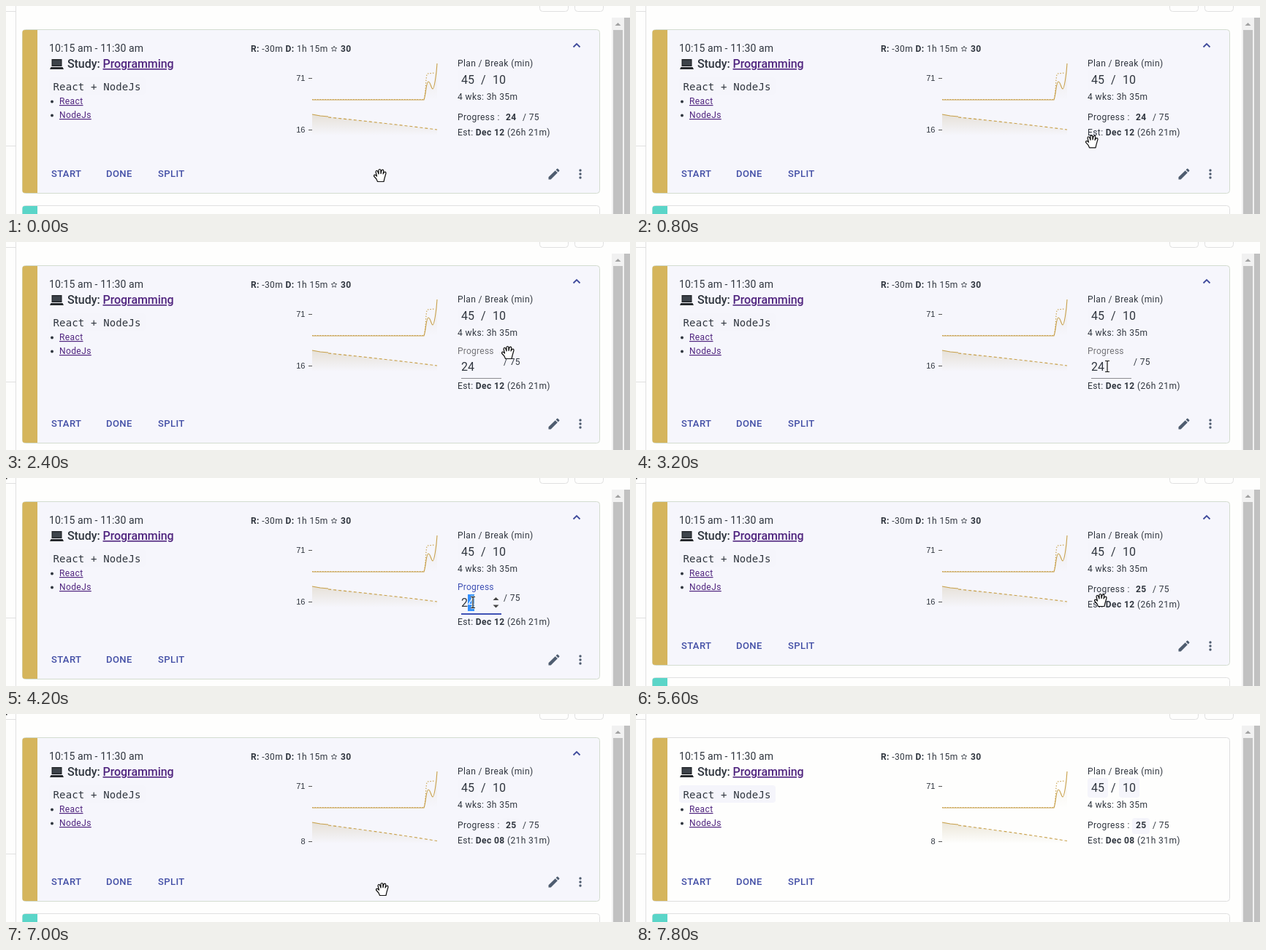
An HTML page that plays this animation: 854 px wide and 286 px high, repeating every 9200 ms.

```html
<!DOCTYPE html>
<html lang="en">
<head>
<meta charset="utf-8">
<title>Study card</title>
<style>
html, body { margin: 0; height: 100%; overflow: hidden; background: #fefefd }
svg { display: block; width: 854px; height: 286px }
text { font: 12px Roboto, sans-serif; letter-spacing: .4px; fill: #30363f }
.body { font-size: 14px; letter-spacing: .1px }
.big { font-size: 16px; letter-spacing: 0 }
.title { font-weight: 500; letter-spacing: -.06px }
.code { font: 14px "DejaVu Sans Mono", monospace; letter-spacing: .15px }
.axis { font: 11px "Liberation Sans", Arial, sans-serif; letter-spacing: 0; text-anchor: end }
.btn { font-size: 13px; font-weight: 500; letter-spacing: .42px; fill: #434fa6 }
.link { fill: #50257f; text-decoration: underline }
.b { font-weight: 700 }
.frame { fill: none; stroke: #e0e0e0 }
.chip { fill: #f5f5fb }
.plot { fill: none; stroke: #c8a04a; stroke-width: 1.1 }
#label { letter-spacing: .25px }
</style>
</head>
<body>
<svg viewBox="0 0 854 286">
  <defs>
    <linearGradient id="fade" x1="0" y1="0" x2="0" y2="1">
      <stop offset="0" stop-color="#bba878" stop-opacity=".27"/>
      <stop offset="1" stop-color="#bba878" stop-opacity="0"/>
    </linearGradient>
  </defs>

  <!-- page surroundings -->
  <path class="frame" d="M13.5 0V286M0 7.5H13M0 192.5H13"/>
  <rect class="frame" x="730.5" y="-20" width="39" height="27.5" rx="4"/>
  <rect class="frame" x="778.5" y="-20" width="39" height="27.5" rx="4"/>
  <path fill="#f1f1f1" d="M829 16h17v270h-17z"/>
  <path fill="#c1c1c1" d="M831 33h13v253h-13zM846 16h8v270h-8z"/>
  <path fill="#a0a0a0" d="M833.500 27l4-4 4 4z"/>
  <rect id="mark" width="1.500" height="1.500" fill="#222"/>
  <g id="next">
    <rect class="frame" x="22.5" y="274.5" width="790" height="40" rx="4"/>
    <path fill="#5ad5c8" d="M43 275H26q-3.500 0-3.500 3V286H43z"/>
  </g>

  <!-- card -->
  <rect id="card" x="22.5" y="32.5" width="790" rx="4"/>
  <path id="bar" fill="#d5b55c"/>
  <text class="body" x="59" y="63">10:15 am - 11:30 am</text>
  <path fill="#25282c" d="M62.500 73h14v10h-14zM61.500 84h16l1.500 3h-19z"/>
  <path fill="#3d434a" d="M64 74.500h11v7h-11z"/>
  <text class="big title" x="84" y="85">Study: <tspan class="link">Programming</tspan></text>
  <text x="335" y="63"><tspan class="b">R:</tspan> -30m <tspan class="b">D:</tspan> 1h 15m</text>
  <path id="star" fill="none" stroke="#30363f" stroke-width=".8"/>
  <text class="b" x="458" y="63">30</text>
  <rect class="chip" x="59" y="98" width="132" height="24" rx="4"/>
  <text class="code" x="64.500" y="115.500">React + NodeJs</text>
  <g fill="#30363f"><circle cx="63" cy="131.500" r="2"/><circle cx="63" cy="150.500" r="2"/></g>
  <text class="link" x="73" y="135">React</text>
  <text class="link" x="73" y="154">NodeJs</text>

  <!-- charts -->
  <text class="axis" x="409.500" y="103">71</text>
  <text class="axis" id="low" x="409.500"></text>
  <path id="ticks" stroke="#555"/>
  <path fill="url(#fade)" opacity=".6" d="M572 129C575 120 575 104 578 104S582 114 584 114 589 95 590 79V129z"/>
  <path class="plot" d="M419 129H572C575 120 575 104 578 104S582 114 584 114 589 95 590 79"/>
  <path class="plot" stroke-dasharray="1.500 2" d="M419 128.500H572C575 120 574 94 577 93L587 92"/>
  <path id="area" fill="url(#fade)"/>
  <path class="plot" d="M419 149L430 151 441 152"/>
  <path class="plot" id="trend" stroke-dasharray="4 3"/>

  <!-- figures -->
  <text x="618" y="83">Plan / Break (min)</text>
  <rect class="chip" x="618" y="88" width="28" height="27" rx="4"/>
  <rect class="chip" x="661" y="88" width="28" height="27" rx="4"/>
  <text class="big" x="623" y="107">45</text>
  <text class="big" x="650" y="107">/</text>
  <text class="big" x="666" y="107">10</text>
  <text x="618" y="129">4 wks: 3h 35m</text>
  <g id="view">
    <rect class="chip" x="679" y="143" width="24" height="22" rx="4"/>
    <text x="618" y="157">Progress :</text>
    <text class="b" id="count" x="684" y="157"></text>
    <text x="707" y="157">/ 75</text>
  </g>
  <g id="edit">
    <text id="label" x="618" y="154">Progress</text>
    <rect id="pick" x="632" y="160" width="9" height="23" fill="#3390ff"/>
    <text class="big" x="623" y="177"><tspan id="first">2</tspan><tspan id="second"></tspan></text>
    <text x="681" y="169">/ 75</text>
    <path id="line"/>
    <path id="spin" fill="#444" d="M666.500 168l4-4 4 4zM666.500 174.500h8l-4 4z"/>
  </g>
  <text id="est" x="618">Est: <tspan class="b" id="day"></tspan> <tspan id="left"></tspan></text>

  <!-- actions -->
  <g id="foot">
    <text class="btn" x="62" y="235">START</text>
    <text class="btn" x="137" y="235">DONE</text>
    <text class="btn" x="208" y="235">SPLIT</text>
    <g class="hover" fill="#4f5d70">
      <path transform="translate(740 221) scale(.833)" d="M3 17.250V21h3.750L17.800 9.940l-3.750-3.750zM20.700 7.040a1 1 0 0 0 0-1.410l-2.340-2.340a1 1 0 0 0-1.410 0l-1.830 1.830 3.750 3.750z"/>
      <circle cx="786" cy="226" r="1.700"/><circle cx="786" cy="231" r="1.700"/><circle cx="786" cy="236" r="1.700"/>
    </g>
  </g>
  <path class="hover" fill="none" stroke="#3f4b9c" stroke-width="1.800" d="M776.500 56.500l4.500-4.500 4.500 4.500"/>

  <!-- pointers -->
  <path id="hand" fill="#fff" stroke="#111" stroke-width="1.200" stroke-linejoin="round"
    d="M-3.500 8.500L-5 5-8.500 1Q-8.500-1.500-6-.5L-4.500 1-6-5Q-5.500-7.500-3.500-6L-2-2V-7.500Q-.5-9.500.8-7.500L1-2.500 2-7Q4-9 4.800-6.500L4-2 5.500-4.500Q8-5.500 8-3L6 4 5 8.500z"/>
  <g id="beam" fill="none">
    <path stroke="#fff" stroke-width="2.500" d="M-3-7.500H3M0-7.500V7.500M-3 7.500H3"/>
    <path stroke="#111" stroke-width="1.200" d="M-3-7.500H3M0-7.500V7.500M-3 7.500H3"/>
  </g>
</svg>
<script>
const LOOP = 9200, STEP = 200;
const $ = id => document.getElementById(id);
const show = (el, on) => el.style.display = on ? '' : 'none';
const set = (id, attrs) => { for (const k in attrs) $(id).setAttribute(k, attrs[k]); };
const put = (id, text) => { if ($(id).textContent !== text) $(id).textContent = text; };

// pointer keys: time, shape, x, y; runs of one shape are interpolated
const keys = [
  [0, 'hand', 512, 233], [1200, 'hand', 680, 163], [1400, 'beam', 687, 155],
  [1600, 'beam', 689, 157], [1800, 'beam', 687, 154], [2200, 'hand', 687, 152],
  [2400, 'hand', 687, 152], [2800, 'hand', 662, 165], [3000, 'beam', 650, 171],
  [3200, 'beam', 645, 171], [4200, 'beam', 639, 171], [5600, 'hand', 636, 168],
  [6400, 'hand', 636, 168], [7000, 'hand', 515, 241], [7400, 'hand', 512, 252],
  [7600, '', 0, 0], [LOOP, '', 0, 0]
];

function pointer(t) {
  const i = keys.findIndex(k => k[0] > t) - 1;
  const [t0, shape, x0, y0] = keys[i], [t1, next, x1, y1] = keys[i + 1];
  const p = shape === next ? (t - t0) / (t1 - t0) : 0;
  return [shape, x0 + (x1 - x0) * p, y0 + (y1 - y0) * p];
}

const points = Array.from({ length: 10 }, (_, i) => {
  const a = i * Math.PI / 5, r = i % 2 ? 1.8 : 4;
  return `${449 + r * Math.sin(a)} ${59 - r * Math.cos(a)}`;
});
set('star', { d: `M${points.join('L')}z` });

function draw(t) {
  const editing = t >= 2200 && t < 5600, focus = t >= 3400;
  const picked = t >= 4000 && t < 5000;
  const updated = t >= 6800, hover = t < 7800;
  const shift = editing ? 19 : 0, bottom = 257 + shift;

  set('card', { height: 225 + shift, fill: hover ? '#f6f6fc' : '#fefefd', stroke: hover ? '#d3dccf' : '#dedede' });
  set('bar', { d: `M43 33H26q-3.500 0-3.500 3V${bottom - 3}q0 3 3.500 3H43z` });
  set('foot', { transform: `translate(0 ${shift})` });
  document.querySelectorAll('.hover').forEach(el => show(el, hover));
  show($('next'), !editing);
  show($('mark'), t >= 3400);

  show($('view'), !editing);
  show($('edit'), editing);
  put('count', t < 5600 ? '24' : '25');
  $('label').style.fill = focus ? '#3f51b5' : '#757579';
  set('line', focus ? { d: 'M623 186h55v2h-55z', fill: '#3f51b5' } : { d: 'M623 187h55v1h-55z', fill: '#8b8b90' });
  show($('spin'), focus);
  show($('pick'), picked);
  put('second', t < 5000 ? '4' : t < 5200 ? '' : '5');
  $('second').style.fill = picked ? '#fff' : '';

  set('est', { y: editing ? 202 : 178 });
  put('day', updated ? 'Dec 08' : 'Dec 12');
  put('left', updated ? '(21h 31m)' : '(26h 21m)');

  const end = updated ? 174.5 : 170;
  put('low', updated ? '8' : '16');
  set('low', { y: updated ? 179 : 174 });
  set('ticks', { d: `M414 99.500h5M414 ${updated ? 175.5 : 170.5}h5` });
  set('trend', { d: `M441 153Q520 ${updated ? 163 : 161} 590 ${end}` });
  set('area', { d: `M419 149L441 152 590 ${end}V178H419z` });

  const [shape, x, y] = pointer(t);
  for (const id of ['hand', 'beam']) {
    show($(id), id === shape);
    set(id, { transform: `translate(${x} ${y})` });
  }
}

function tick() {
  draw(Math.floor(performance.now() % LOOP / STEP) * STEP);
  requestAnimationFrame(tick);
}
tick();
</script>
</body>
</html>
```
